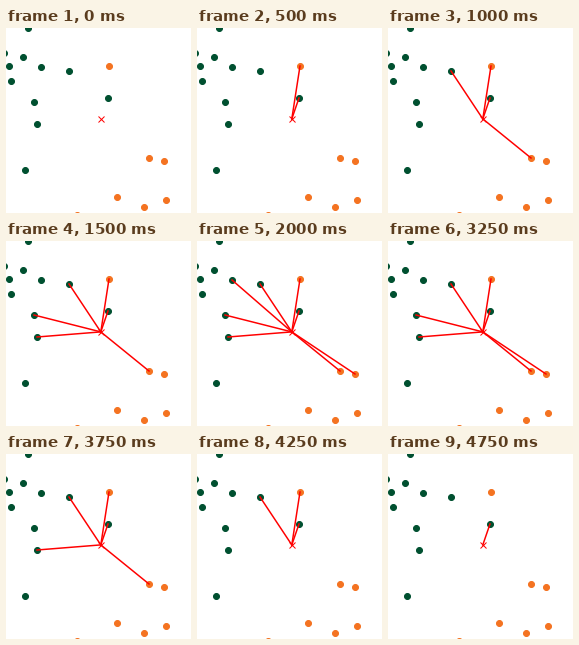
These frames come from a looping animation (185 by 185 pixels, 5000 ms). A matplotlib script:

```python
import matplotlib.pyplot as plt
from matplotlib.animation import FuncAnimation

SIZE, DPI = 185, 72
GREEN, ORANGE, RED = "#005030", "#f47321", "#ff0000"
QUERY = (94.8, 90.9)
MAX_K = 10

# Two classes of sample points in pixels, y pointing down
greens = [(22, 0), (-2, 25), (3, 38), (17, 29), (5, 53), (35, 39),
          (63, 43), (28, 74), (31, 96), (19, 142), (102, 70)]
oranges = [(103, 38), (143, 130), (158, 133), (111, 169),
           (138, 179), (160, 172), (71, 187)]


def distance(p):
    return (p[0] - QUERY[0]) ** 2 + (p[1] - QUERY[1]) ** 2


nearest = sorted(greens + oranges, key=distance)[:MAX_K]

fig = plt.figure(figsize=(SIZE / DPI, SIZE / DPI), dpi=DPI, facecolor="white")
ax = fig.add_axes([0, 0, 1, 1])
ax.set_xlim(0, SIZE)
ax.set_ylim(SIZE, 0)
ax.axis("off")


def marks(points, shape, color):
    ax.plot(*zip(*points), shape, color=color, ms=6, mew=1, zorder=1)


marks(greens, "o", GREEN)
marks(oranges, "o", ORANGE)
marks([QUERY], "x", RED)
links = [ax.plot(*zip(QUERY, p), color=RED, lw=1.5, zorder=2)[0]
         for p in nearest]


def update(frame):
    # k climbs from 0 to MAX_K, then falls back
    k = MAX_K - abs(MAX_K - frame)
    for i, link in enumerate(links):
        link.set_visible(i < k)
    return links


anim = FuncAnimation(fig, update, frames=2 * MAX_K, interval=250,
                     init_func=lambda: update(0), repeat=True, repeat_delay=0)
plt.show()
```
